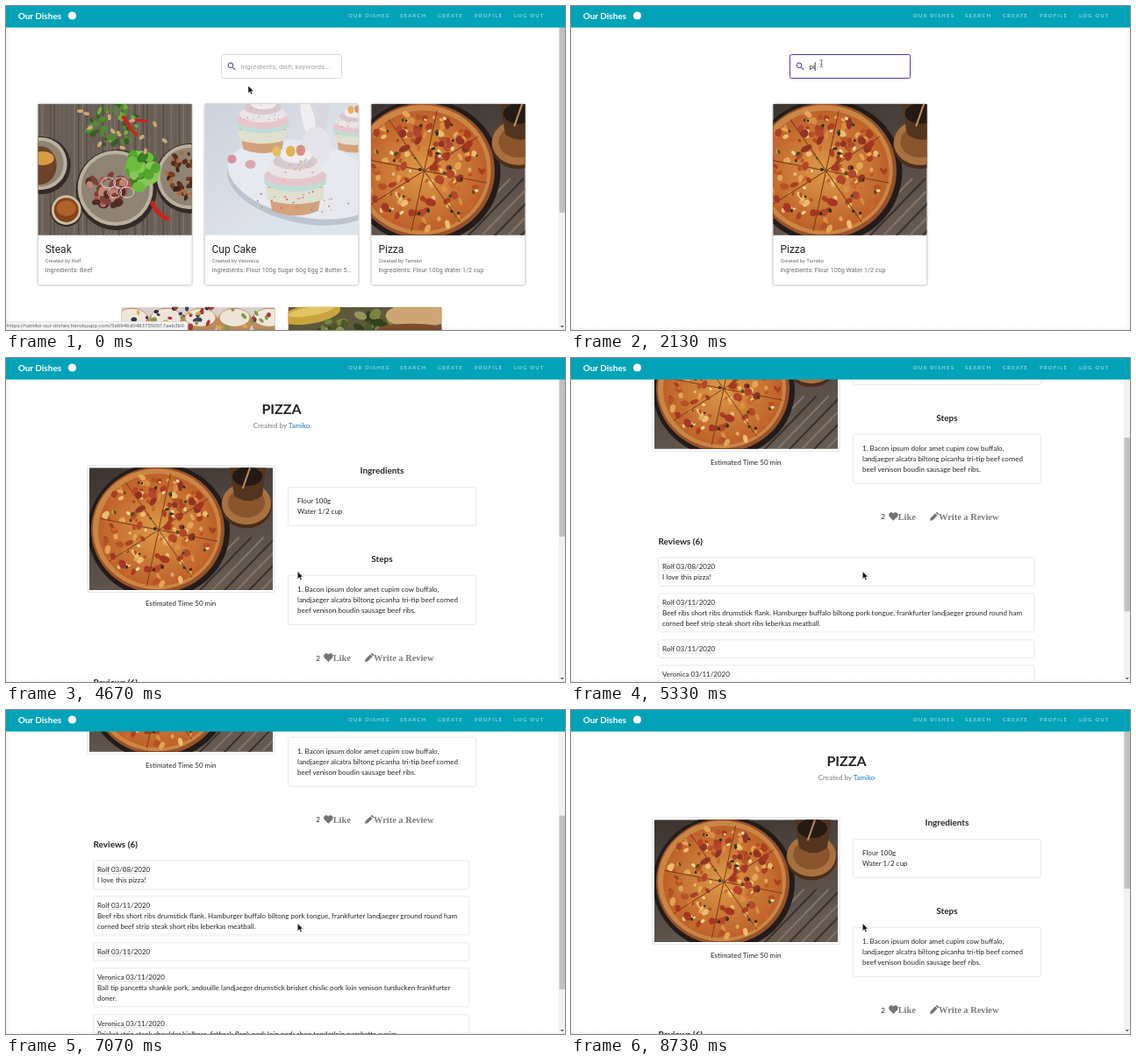
Write an HTML page that moves like this. It is 637 px wide and 370 px high and loops after 9.19 s.

```html
<!DOCTYPE html>
<html lang="en">
<head>
<meta charset="utf-8">
<title>Recipe search</title>
<style>
html, body { margin: 0; width: 100%; height: 100%; overflow: hidden; background: #fff; }
svg { display: block; }
#stage { width: 637px; height: 370px; }
text { white-space: pre; fill: #212529; }
.lato { font-family: Lato, sans-serif; }
.roboto { font-family: Roboto, sans-serif; }
.serif { font-family: "Liberation Serif", serif; font-weight: 700; }
.status { font-family: "Open Sans", sans-serif; }
.b { font-weight: 700; }
.mid { text-anchor: middle; }
.card { filter: drop-shadow(0 .8px .8px rgba(0,0,0,.5)); }
.box { fill: #fff; stroke: #dedede; stroke-width: .7; }
</style>
</head>
<body>
<svg id="stage" viewBox="0 0 637 370" xmlns="http://www.w3.org/2000/svg"></svg>
<script>
const LOOP = 9190, STEP = 1000 / 15;
const TEAL = '#02a3b8', BLUE = '#463db6';
const URL_TEXT = 'https://tamiko-our-dishes.herokuapp.com/5e6946d04837550017aeb3b0';

let seed = 7;
const rnd = () => (seed = (seed * 16807) % 2147483647) / 2147483647;
const range = (a, b) => a + (b - a) * rnd();
const pick = list => list[Math.floor(rnd() * list.length)];
const repeat = (n, f) => Array.from({ length: n }, (_, i) => f(i)).join('');

const text = (x, y, size, cls, str, more = '') =>
  `<text x="${x}" y="${y}" font-size="${size}" class="${cls}" ${more}>${str}</text>`;
const rect = (x, y, w, h, more = '') =>
  `<rect x="${x}" y="${y}" width="${w}" height="${h}" ${more}/>`;
const oval = (x, y, rx, ry, fill, more = '') =>
  `<ellipse cx="${x}" cy="${y}" rx="${rx}" ry="${ry}" fill="${fill}" ${more}/>`;
const line = (d, color, width) =>
  `<path d="${d}" fill="none" stroke="${color}" stroke-width="${width}" stroke-linecap="round"/>`;
const spin = (a, x, y) => `transform="rotate(${a} ${x} ${y})"`;

function scatter(n, cx, cy, rx, ry, lo, hi, colors) {
  return repeat(n, () => {
    const a = range(0, 6.283), d = Math.sqrt(rnd());
    const x = (cx + rx * d * Math.cos(a)).toFixed(1), y = (cy + ry * d * Math.sin(a)).toFixed(1);
    return oval(x, y, range(lo, hi).toFixed(1), range(lo, hi * .7).toFixed(1),
      pick(colors), spin(Math.round(range(0, 180)), x, y));
  });
}

function pizza() {
  const slices = repeat(4, i => {
    const a = .2 + i * Math.PI / 4, x = 68 * Math.cos(a), y = 65 * Math.sin(a);
    return line(`M${79 - x} ${71 - y}L${79 + x} ${71 + y}`, '#7c3a17', 1);
  });
  return rect(0, 0, 209, 140, 'fill="url(#wood)"') +
    repeat(9, i => line(`M${110 + i * 14} 142l60 -62`, i % 2 ? '#37302c' : '#857469', 2)) +
    oval(79, 72, 81, 77, '#231c1a') + oval(78, 71, 76, 72, '#96522a') +
    oval(77, 70, 73, 69, '#cb8544') + oval(78, 71, 68, 64, 'url(#cheese)') +
    scatter(150, 78, 71, 67, 63, 1.5, 5, ['#ecbd70', '#da8e40', '#b65225', '#e3a455', '#a84020', '#c96a2c']) + slices +
    scatter(26, 78, 71, 61, 57, 3, 6.5, ['#8f3426', '#b5452c', '#a53624']) +
    scatter(40, 78, 71, 64, 60, 1, 2.8, ['#4a4a22', '#2f3019', '#f4d799']) +
    oval(179, 44, 29, 25, '#4a2d1b') + oval(179, 41, 28, 24, '#a9713f') + oval(179, 40, 21, 17, '#8a552d') +
    '<path d="M160 0h41l-4 32q-16 12-32 0z" fill="#53341f"/>' +
    oval(180, 10, 17, 11, '#241a14') + line('M183 0l-8 23', '#b88a58', 2);
}

function steak() {
  const plate = (x, y, r) => oval(x + 1, y + 2, r + 3, r + 3, '#322b27') + oval(x, y, r, r, '#bbb09d') + oval(x, y, r - 4, r - 4, '#8f8474');
  return rect(0, 0, 175, 150, 'fill="#6b6159"') +
    repeat(40, i => line(`M${(i * 4.6).toFixed(1)} 0v150`, pick(['#544b44', '#7d7168', '#665c54']), 1.4)) +
    plate(3, 68, 30) + oval(2, 70, 19, 22, '#6d4228') + oval(5, 62, 13, 8, '#d99a45') +
    plate(172, 83, 37) + scatter(60, 172, 80, 25, 27, 1.5, 4.5, ['#5b2c1d', '#7b3f25', '#39251c', '#b0693a']) +
    plate(88, 96, 43) +
    scatter(30, 118, 76, 17, 21, 4, 9, ['#55a52f', '#6cbd3c', '#3a7d22', '#86c857']) +
    scatter(34, 80, 98, 24, 19, 3, 8, ['#7c4035', '#a25b4d', '#542a25', '#c38474']) +
    repeat(4, i => oval(80 + i * 7, 90 + (i % 2) * 11, 8, 6, 'none', 'stroke="#e6d3d4" stroke-width="1"')) +
    scatter(55, 86, 24, 29, 24, 1.5, 5, ['#4c8f2a', '#75ac45', '#335f1e', '#5f7f45']) +
    oval(32, 122, 18, 18, '#2e2824') + oval(32, 121, 17, 17, '#cbbda5') + oval(32, 121, 14, 14, '#85431a') + oval(32, 119, 11, 9, '#ae6129') +
    line('M130 113q6 14 17 18', '#c9241c', 5) + line('M97 15q9 14 14 20', '#c9241c', 4) + line('M110 18l14 2', '#c9241c', 3) +
    repeat(13, i => {
      const x = 48 + (i * 37) % 100, y = 8 + (i * 23) % 50;
      return oval(x, y, 3.5, 2, '#d0a873', spin(i * 50, x, y));
    });
}

function cupCake() {
  const cake = (x, y, k) => `<g transform="translate(${x} ${y}) scale(${k})">` +
    '<path d="M-31 10h62l-6 33q-25 10-50 0z" fill="#d3a27c"/><path d="M-32 18h64l-2 13q-30 9-60 0z" fill="#dfe0cf"/>' +
    oval(0, 11, 34, 11, '#bfdcd5') + oval(0, 5, 34, 11, '#e6c6cd') +
    oval(0, -3, 30, 11, '#e9e4e6') + oval(0, -11, 24, 9, '#d6c9ce') + oval(1, -17, 17, 8, '#f1ecec') +
    scatter(14, 0, -2, 27, 13, .7, 1.4, ['#d98ca2', '#92c4c0', '#e0b76c']) +
    oval(-5, -22, 5, 6, '#dfb450') + oval(6, -23, 5, 6, '#d98d7c') + '</g>';
  return rect(0, 0, 175, 150, 'fill="url(#pale)"') +
    oval(112, 92, 88, 44, '#bcc4d2', spin(12, 112, 92)) + oval(113, 86, 88, 43, '#e6e9ef', spin(12, 113, 86)) +
    oval(118, 17, 7, 27, '#f0eef0', spin(-13, 118, 17)) + oval(134, 14, 7, 27, '#d9d8de', spin(10, 134, 14)) +
    oval(127, 49, 17, 23, '#e4e4ea') + cake(170, 22, .7) + cake(66, 14, .88) + cake(103, 77, 1.05) +
    oval(52, 69, 6, 5, '#d9a9ae') + oval(31, 63, 5, 5, '#d98fa4') + oval(82, 54, 5, 6, '#e3bd60') +
    scatter(24, 110, 112, 60, 15, .7, 1.4, ['#cf7293', '#a47bba', '#db995f', '#df5f58']);
}

const berries = () => rect(0, 0, 175, 60, 'fill="#d9d2cc"') +
  repeat(5, i => oval(12 + i * 39, 17, 20, 16, '#bb8c5c') + oval(12 + i * 39, 12, 17, 10, '#eee5da')) +
  scatter(44, 88, 12, 84, 13, 1.5, 4.5, ['#38405f', '#a9383b', '#d9a84b', '#2a2f45', '#7c9b45']);

const sandwich = () => rect(0, 0, 175, 60, 'fill="#5d583b"') +
  oval(26, 8, 34, 11, '#c9a43c', spin(-10, 26, 8)) + oval(26, 5, 26, 5, '#e0c462', spin(-10, 26, 5)) +
  scatter(46, 82, 24, 50, 17, 2, 8, ['#4a5a28', '#75853f', '#33401d', '#94955c']) +
  oval(147, 10, 36, 14, '#cda673') + oval(140, 25, 38, 6, '#7f4c2c');

const photo = (id, x, y, w, h) => `<use href="#${id}" x="${x}" y="${y}" width="${w}" height="${h}"/>`;
const symbol = (id, w, h, body) =>
  `<symbol id="${id}" viewBox="0 0 ${w} ${h}" preserveAspectRatio="xMidYMid slice">${body}</symbol>`;

function card(x, y, id, name, author, list) {
  const grey = 'fill-opacity=".68"';
  return `<g class="card">${rect(x, y, 175, 206.5, 'rx="2" fill="#fff"')}</g>` +
    photo(id, x, y, 175, 149.8) +
    text(x + 8, y + 170.3, 12, 'roboto', name) +
    text(x + 8, y + 180.5, 6, 'roboto', 'Created by ' + author, grey) +
    text(x + 8, y + 192.2, 7, 'roboto', 'Ingredients: ' + list, grey + ' letter-spacing=".075"');
}
const pizzaCard = x => card(x, 112, 'pizza', 'Pizza', 'Tamiko', 'Flour 100g Water 1/2 cup');

const search = `<g id="search">
  <rect id="field" x="245.5" y="55.5" width="137" height="27" rx="2" fill="#fff"/>
  <path transform="translate(251.2 63) scale(.5)" fill="${BLUE}" d="M15.5 14h-.8l-.3-.3A6.5 6.5 0 1 0 13.7 14.4l.3.3v.8l5 5 1.5-1.5zM9.5 14a4.5 4.5 0 1 1 0-9 4.5 4.5 0 0 1 0 9z"/>
  ${text(267.5, 71.8, 8, 'roboto', 'Ingredients, dish, keywords...', 'id="hint" style="fill:#a2a2a2"')}
  ${text(267.5, 71.8, 8, 'roboto', '', 'id="typed"')}
  ${rect(0, 64, .8, 10, 'id="caret" fill="#222"')}</g>`;

const home = `<g id="home"><g id="all">
  ${card(36.7, 112, 'steak', 'Steak', 'Rolf', 'Beef')}
  ${card(226.5, 112, 'cupcake', 'Cup Cake', 'Veronica', 'Flour 100g Sugar 60g Egg 2 Butter 5…')}
  ${pizzaCard(416.4)}
  ${photo('berries', 131.5, 343.7, 175, 60)}${photo('sandwich', 321.5, 343.7, 175, 60)}</g>
  <g id="one">${pizzaCard(230.4)}</g>${search}</g>`;

const reviews = [
  [389, 32.5, 'Rolf 03/08/2020', 'I love this pizza!'],
  [430, 44, 'Rolf 03/11/2020', 'Beef ribs short ribs drumstick flank. Hamburger buffalo biltong pork tongue, frankfurter landjaeger ground round ham', 'corned beef strip steak short ribs leberkas meatball.'],
  [483, 20.5, 'Rolf 03/11/2020'],
  [512, 44, 'Veronica 03/11/2020', 'Ball tip pancetta shankle pork, andouille landjaeger drumstick brisket chislic pork loin venison turducken frankfurter', 'doner.'],
  [565, 32.5, 'Veronica 03/11/2020', 'Brisket strip steak shoulder kielbasa, fatback flank pork loin pork chop tenderloin porchetta cupim.']
].map(([y, h, head, ...body]) =>
  rect(99.7, y, 428.3, h, 'rx="2" class="box"') + text(104, y + 13.2, 8, 'lato dotted', head) +
  body.map((s, i) => text(104, y + 25.2 + i * 12, 8, 'lato', s)).join('')).join('');

const GREY = 'style="fill:#7d7d7d"';
const detail = `<g id="detail">
  ${text(314, 63.7, 16, 'lato b mid', 'PIZZA')}
  ${text(314, 79.7, 8, 'lato mid', 'Created by <tspan fill="#1578c8">Tamiko</tspan>', 'style="fill:#757b80"')}
  ${rect(92.7, 123, 213.6, 144.5, 'rx="2" class="box"')}
  ${photo('pizza', 95, 125.3, 209, 139.7)}
  ${text(199.3, 283, 8, 'lato mid', 'Estimated Time 50 min')}
  ${text(428.5, 132.4, 10, 'lato b mid', 'Ingredients')}
  ${rect(321.6, 147.2, 214, 44.3, 'rx="2" class="box"')}
  ${text(332, 166.2, 8, 'lato', 'Flour 100g')}${text(332, 178.2, 8, 'lato', 'Water 1/2 cup')}
  ${text(428.5, 233.4, 10, 'lato b mid', 'Steps')}
  ${rect(321.6, 248.2, 214, 56.3, 'rx="2" class="box"')}
  ${['1. Bacon ipsum dolor amet cupim cow buffalo,', 'landjaeger alcatra biltong picanha tri-tip beef corned', 'beef venison boudin sausage beef ribs.']
    .map((s, i) => text(332, 267.2 + i * 12, 8, 'lato', s)).join('')}
  ${text(353.3, 345.6, 8, 'lato', '2')}
  <path transform="translate(362 337)" fill="#757575" d="M5.4 10L.9 5.4C-.6 3.6.2.5 2.7.3 4 .2 4.9.9 5.4 1.6 5.9.9 6.8.2 8.1.3 10.6.5 11.4 3.6 9.9 5.4z"/>
  ${text(372.7, 345.7, 10.4, 'serif', 'Like', GREY)}
  <path transform="translate(409 337)" fill="#757575" d="M0 10l.6-3L6 1.6l2.5 2.5L3.1 9.5zM6.6 1L7.3.3q.6-.5 1.2 0L9.9 1.7q.5.5 0 1.1l-.8.7z"/>
  ${text(419, 345.7, 10.4, 'serif', 'Write a Review', GREY)}
  ${text(99.5, 374.2, 10, 'lato b', 'Reviews (6)')}
  ${reviews}
  ${rect(99.5, 613.5, 53.3, 18.7, `rx="2" fill="${TEAL}"`)}
  ${text(126.1, 625.8, 8, 'lato mid', 'Show More', 'style="fill:#fff"')}</g>`;

const nav = rect(0, 0, 637, 24.6, `fill="${TEAL}"`) +
  text(13.7, 14.7, 10, 'lato b', 'Our Dishes', 'style="fill:#fff"') +
  '<circle cx="75.5" cy="11" r="4.6" fill="#fff"/>' +
  [[390, 'OUR DISHES'], [449, 'SEARCH'], [492, 'CREATE'], [534, 'PROFILE'], [579, 'LOG OUT']]
    .map(([x, s]) => text(x, 13.2, 6, 'lato b', s, 'style="fill:#8fd4de" letter-spacing="1.15"')).join('');

const overlay = `<g fill="url(#edge)">${rect(0, 24, 5, 346)}
    <rect width="5" height="346" transform="translate(637 24) scale(-1 1)"/>
    <rect width="4" height="637" transform="translate(0 370) rotate(-90)"/></g>
  <g id="bar">${rect(629.7, 24, 8, 346, 'fill="#f1f1f1"')}
    ${rect(630.5, 0, 6.5, 10, 'id="thumb" fill="#c1c1c1"')}
    <path d="M631.8 365h4l-2 2.3z" fill="#555"/></g>
  <g id="status"><path d="M0 360.3h205q2 0 2 2v8H0z" fill="#f3f3f3" stroke="#d5d5d5" stroke-width=".5"/>
    ${text(.8, 367.3, 6, 'status', URL_TEXT, 'style="fill:#555"')}</g>`;

const pointers = `
  <path id="arrow" d="M0 0v8.7l2-1.9 1.4 3.2 1.5-.6-1.4-3.1h2.7z" fill="#111" stroke="#fff" stroke-width=".5"/>
  <path id="beam" d="M-1.8 -4q1.8 0 1.8 1v6q0 1-1.8 1M1.8 -4q-1.8 0-1.8 1M1.8 4q-1.8 0-1.8-1M-1 .8h2" fill="none" stroke="#444" stroke-width=".7"/>
  <path id="hand" d="M-1 0q1-1 2 0v3.5l3.5.8q1 .3 1 1.4L4.7 10H-.2L-3.3 6q0-1.3 1.3-.8l1 .8z" fill="#fff" stroke="#111" stroke-width=".6"/>`;

const stage = document.getElementById('stage');
stage.innerHTML = `<defs>
  <radialGradient id="cheese"><stop stop-color="#dd9a48"/><stop offset="1" stop-color="#bd612a"/></radialGradient>
  <linearGradient id="wood" x2=".4" y2="1"><stop stop-color="#3a3330"/><stop offset="1" stop-color="#655950"/></linearGradient>
  <linearGradient id="pale" x2="1" y2="1"><stop stop-color="#ccd2dc"/><stop offset=".6" stop-color="#dde1e9"/><stop offset="1" stop-color="#dfe3ea"/></linearGradient>
  <linearGradient id="edge"><stop stop-opacity=".05"/><stop offset="1" stop-opacity="0"/></linearGradient>
  ${symbol('pizza', 209, 139.7, pizza())}${symbol('steak', 175, 150, steak())}${symbol('cupcake', 175, 150, cupCake())}
  ${symbol('berries', 175, 60, berries())}${symbol('sandwich', 175, 60, sandwich())}</defs>
  ${rect(0, 0, 637, 370, 'fill="#fff"')}${home}${detail}${overlay}${nav}${pointers}`;

// Dotted rules under the review headings follow the text width.
stage.querySelectorAll('.dotted').forEach(n => {
  const y = +n.getAttribute('y') + 1.8;
  n.insertAdjacentHTML('afterend',
    `<path d="M104 ${y}h${n.getComputedTextLength()}" stroke="#777" stroke-width=".5" stroke-dasharray=".6 .6"/>`);
});

const el = {};
stage.querySelectorAll('[id]').forEach(n => el[n.id] = n);
const show = (id, on) => el[id].setAttribute('display', on ? 'inline' : 'none');
const set = (id, name, value) => el[id].setAttribute(name, value);

const part = (t, a, b) => Math.min(1, Math.max(0, (t - a) / (b - a)));
const smooth = u => u * u * (3 - 2 * u);
const easeOut = u => 1 - (1 - u) * (1 - u);
const mix = (a, b, u) => a + (b - a) * u;

const FOCUS = 730, KEY_P = 1330, KEY_I = 1730, OPEN = 3395, MAX_SCROLL = 297;

function draw(time) {
  const t = Math.floor((time % LOOP + 4) / STEP) * STEP;
  const opened = t >= OPEN, focused = t >= FOCUS, single = t >= KEY_I;
  const typed = single ? 'pi' : t >= KEY_P ? 'p' : '';

  const toField = smooth(part(t, 0, 665)), toCard = smooth(part(t, 2400, 3130));
  const x = mix(mix(276, 285.3, toField), 332.3, toCard);
  const y = mix(mix(91, 65.6, toField), 243.7, toCard);
  const inField = !opened && y > 55 && y < 83, onCard = !opened && y > 112;

  show('home', !opened);
  show('detail', opened);
  show('all', !single);
  show('one', single);
  set('search', 'transform', `translate(${single ? 4 : 0} 0)`);
  set('field', 'stroke', focused ? BLUE : inField ? '#333' : '#c4c4c4');
  set('field', 'stroke-width', focused ? 1 : .6);
  show('hint', !typed);
  el.typed.textContent = typed;
  const lastKey = single ? KEY_I : typed ? KEY_P : FOCUS;
  show('caret', focused && Math.floor((t - lastKey) / 530) % 2 === 0);
  set('caret', 'x', 267.3 + (typed ? el.typed.getComputedTextLength() : 0));

  const scroll = MAX_SCROLL * (easeOut(part(t, 4800, 6448)) - easeOut(part(t, 6800, 8640)));
  set('detail', 'transform', `translate(0 ${-scroll.toFixed(2)})`);
  show('bar', opened || !single);
  set('thumb', 'y', 5.5 + .53 * scroll);
  set('thumb', 'height', opened ? 198.5 : 230.5);
  show('status', t < 330 || onCard || (opened && t < 3590));

  const shape = inField ? 'beam' : onCard ? 'hand' : 'arrow';
  ['arrow', 'beam', 'hand'].forEach(id => {
    show(id, id === shape);
    set(id, 'transform', `translate(${x.toFixed(2)} ${y.toFixed(2)})`);
  });
}

const start = performance.now();
function tick() {
  draw(performance.now() - start);
  requestAnimationFrame(tick);
}
tick();
</script>
</body>
</html>
```
